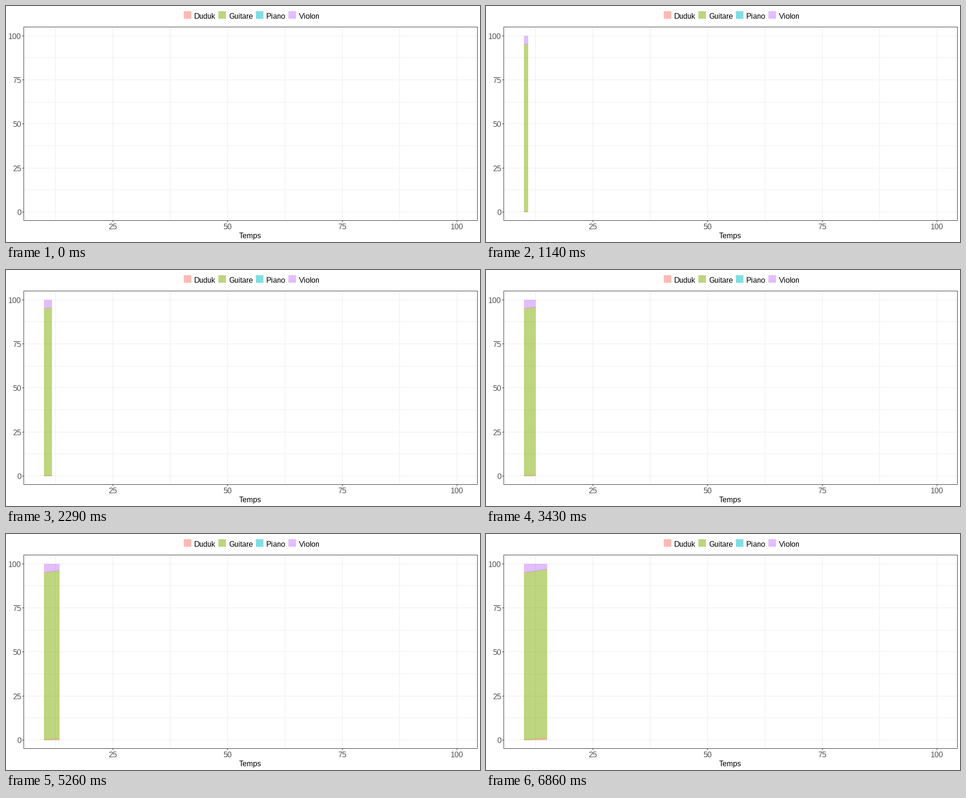
Animation, 1000 px wide and 500 px high, one loop 8000 ms. Source, as a matplotlib script:

```python
import matplotlib.pyplot as plt
from matplotlib.animation import FuncAnimation
from matplotlib.patches import Polygon, Rectangle

W, H, DPI = 1000, 500, 100
PX = 72 / DPI
LOOP, INTERVAL, STEPS = 8000, 40, 7
GRID, DARK, LABEL = "#ebebeb", "#333333", "#4d4d4d"
LEFT, RIGHT, TOP, BOTTOM = 37.5, 994.5, 44.5, 454.5
COLORS = {"Duduk": "#f8766d", "Guitare": "#7cae00",
          "Piano": "#00bfc4", "Violon": "#c77cff"}

# Share of each instrument (percent) at the first and second sample
T0, T1 = 10, 15
SHARES = {"Duduk": (0, 1), "Guitare": (95, 96),
          "Piano": (0, 0), "Violon": (5, 3)}

plt.rcParams.update({
    "font.family": "Liberation Sans",
    "font.size": 16 * PX,
    "path.snap": False,
    "text.hinting": "native",
    "text.hinting_factor": 1,
})

fig = plt.figure(figsize=(W / DPI, H / DPI), dpi=DPI, facecolor="white")
ax = fig.add_axes([0, 0, 1, 1])
ax.set(xlim=(0, W), ylim=(H, 0), autoscale_on=False)
ax.axis("off")


def x_px(t):
    return 80.4 + (t - 10) * 9.676


def y_px(v):
    return 436.3 - 3.73 * v


def center(p):
    """Middle of the pixel that holds p."""
    return int(p) + 0.5


def line(x0, y0, x1, y1, color, z):
    ax.plot([x0, x1], [y0, y1], color=color, lw=PX, zorder=z,
            solid_capstyle="butt")


def label(x, y, text, color="black", ha="left"):
    ax.text(x, y, text, color=color, ha=ha, va="baseline", zorder=5)


def draw_panel():
    for i in range(1, 9):
        x = center(x_px(12.5 * i))
        line(x, TOP, x, BOTTOM, GRID, 1)
        if i % 2 == 0:
            line(x, 455, x, 458, DARK, 4)
            label(x, 473, f"{12.5 * i:.0f}", LABEL, "center")
    for i in range(9):
        y = center(y_px(12.5 * i))
        line(LEFT, y, RIGHT, y, GRID, 1)
        if i % 2 == 0:
            line(34, y, 37, y, DARK, 4)
            label(32, int(y) + 7, f"{12.5 * i:.0f}", LABEL, "right")
    ax.add_patch(Rectangle((LEFT, TOP), RIGHT - LEFT, BOTTOM - TOP,
                           fill=False, ec=DARK, lw=PX, zorder=4))
    label(515, 492, "Temps", ha="center")


def draw_legend():
    for (name, color), x in zip(COLORS.items(), (375, 448, 527, 596)):
        ax.add_patch(Rectangle((x, 11), 16, 16, fc=color, alpha=0.5, lw=0))
        label(x + 22, 27, name)


draw_panel()
draw_legend()
areas = {}
for name, color in COLORS.items():
    areas[name] = ax.add_patch(Polygon([(0, 0)] * 4, fc=color, alpha=0.5,
                                       lw=0, aa=False, zorder=3))


def update(frame):
    step = (frame * INTERVAL + INTERVAL - 1) * STEPS // LOOP
    k = step / (STEPS - 1)
    x0, x1 = x_px(T0), x_px(T0 + k * (T1 - T0))
    base0 = base1 = 0
    for name, (first, second) in SHARES.items():
        top0 = base0 + first
        top1 = base1 + first + k * (second - first)
        areas[name].set_xy([(x0, y_px(base0)), (x0, y_px(top0)),
                            (x1, y_px(top1)), (x1, y_px(base1))])
        areas[name].set_visible(step > 0 and first + second > 0)
        base0, base1 = top0, top1
    return list(areas.values())


anim = FuncAnimation(fig, update, frames=LOOP // INTERVAL, interval=INTERVAL,
                     repeat=True, repeat_delay=0, blit=False)
plt.show()
```
